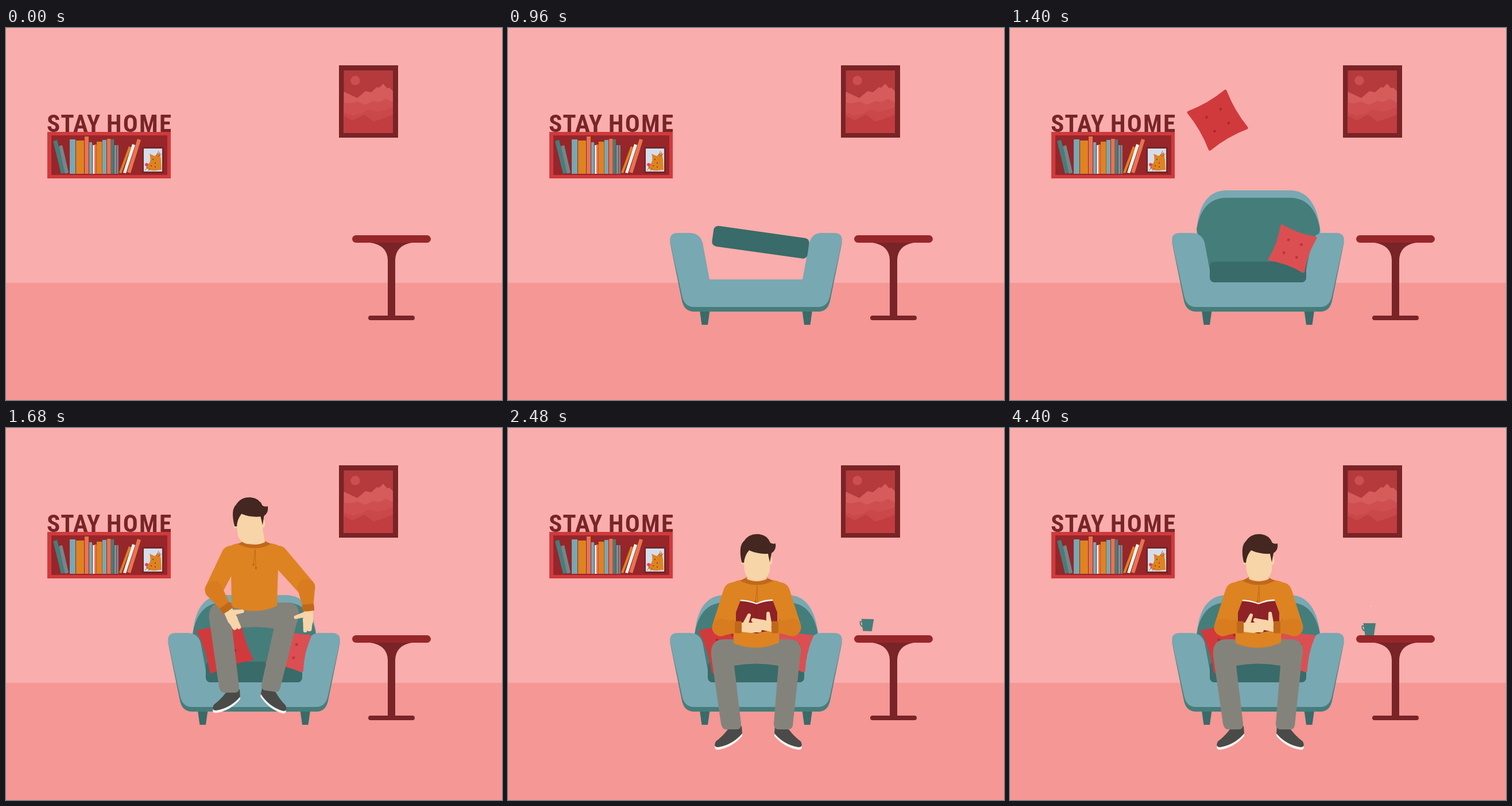
Recreate the animation shown at these times as an HTML page with a canvas. Size 864 by 648 pixels, loop 4.84 s.

```html
<!DOCTYPE html>
<html lang="en">
<head>
<meta charset="utf-8">
<title>Stay home</title>
<style>
html, body { margin: 0; width: 100%; height: 100%; overflow: hidden; background: #f9adac; }
canvas { display: block; width: 864px; height: 648px; }
</style>
</head>
<body>
<canvas id="stage" width="864" height="648"></canvas>
<script>
const ctx = document.getElementById('stage').getContext('2d');
const LOOP = 4840, STEP = 40;
const C = {
  wall: '#f9adac', floor: '#f49795', maroon: '#792427', wine: '#96262a', red: '#d03a3d',
  light: '#78a8b2', mid: '#457d7b', dark: '#386b69',
  orange: '#dd8322', sleeve: '#d97c1f', rust: '#c0681a', coral: '#e8734f',
  skin: '#f8d4a9', hair: '#432720', pants: '#84837b', shoe: '#4a4b48', white: '#f6f3f1'
};
let now = 0;

const rad = d => d * Math.PI / 180;
const mix = (a, b, k) => a + (b - a) * k;
function ease(from, to) {
  const p = Math.min(1, Math.max(0, (now - from) / (to - from)));
  return p * p * (3 - 2 * p);
}

function path(d, color) {
  ctx.fillStyle = color;
  ctx.fill(new Path2D(d));
}
function line(d, color, width) {
  ctx.strokeStyle = color;
  ctx.lineWidth = width;
  ctx.stroke(new Path2D(d));
}
function rect(x, y, w, h, color, r = 0) {
  ctx.fillStyle = color;
  ctx.beginPath();
  ctx.roundRect(x, y, w, h, r);
  ctx.fill();
}
function oval(x, y, rx, ry, color) {
  ctx.fillStyle = color;
  ctx.beginPath();
  ctx.ellipse(x, y, rx, ry, 0, 0, 7);
  ctx.fill();
}
// Rounded bar whose radius runs from r1 to r2
function bar(x1, y1, r1, x2, y2, r2, color) {
  const a = Math.atan2(y2 - y1, x2 - x1), q = Math.PI / 2;
  ctx.fillStyle = color;
  ctx.beginPath();
  ctx.arc(x2, y2, r2, a - q, a + q);
  ctx.arc(x1, y1, r1, a + q, a + 3 * q);
  ctx.fill();
}
// Draw with an offset and a turn around (cx, cy)
function placed(cx, cy, dx, dy, deg, draw) {
  ctx.save();
  ctx.translate(cx + dx, cy + dy);
  ctx.rotate(rad(deg));
  ctx.translate(-cx, -cy);
  draw();
  ctx.restore();
}
function drop(from, to, cx, cy, dx, dy, deg, draw) {
  if (now <= from) return;
  const k = 1 - ease(from, to);
  placed(cx, cy, dx * k, dy * k, deg * k, draw);
}
function mirror(x, draw) {
  ctx.save();
  ctx.translate(2 * x, 0);
  ctx.scale(-1, 1);
  draw();
  ctx.restore();
}

function word(text, x, width) {
  ctx.letterSpacing = '0px';
  const gap = (width - ctx.measureText(text).width) / (text.length - 1);
  ctx.letterSpacing = gap.toFixed(2) + 'px';
  ctx.fillText(text, x, 181);
  ctx.letterSpacing = '0px';
}

function shelf() {
  ctx.fillStyle = C.maroon;
  ctx.font = "bold 43px 'Roboto Condensed', 'Liberation Sans Narrow', Roboto, sans-serif";
  word('STAY', 71, 93);
  word('HOME', 175, 113);
  rect(72, 181, 215, 81, C.red);
  rect(79, 187, 202, 69, C.wine);
  path('M82 197L89 195L103 252L96 254Z', C.mid);
  path('M92 206L98 204L109 252L103 254Z', '#74868a');
  const books = [
    [111, 194, 10, C.light], [122, 196, 14, C.orange], [137, 189, 7, C.coral],
    [145, 199, 5, C.light], [151, 204, 3, C.white], [154, 203, 3.5, C.coral],
    [158, 198, 9.5, C.orange], [168, 195, 7, C.light], [176, 193, 6.5, C.coral],
    [183, 194, 5, C.mid], [189, 204, 2.5, C.light], [192.5, 204, 3.5, '#74868a']
  ];
  for (const [x, y, w, color] of books) rect(x, y, w, 254 - y, color);
  path('M214 206L218 208L201 253L197 252Z', C.orange);
  path('M220 202L225 204L209 253L204 252Z', C.white);
  path('M229 193L235 195L217 253L211 251Z', C.coral);
  rect(237, 207, 38, 46, C.maroon);
  rect(240, 210, 32, 40, '#d5ddec');
  path('M250 219L259 223L268 216L270 230L271 247L262 248Q254 250 245 245Q242 239 250 235Q253 228 250 219Z', C.orange);
  oval(245, 238, 2.8, 2.8, '#e0405a');
  for (const [x, y] of [[256, 229], [260, 235], [253, 240], [260, 242]]) oval(x, y, 0.9, 0.9, C.maroon);
  line('M262 222L266 214M264 224L271 219M247 242L242 248M251 244L248 249', C.maroon, 0.6);
}

function picture() {
  rect(580, 65, 103, 126, C.maroon);
  rect(588.5, 74, 85.5, 109, '#b53a3c');
  oval(608.5, 91.5, 8.3, 8.3, '#cc4e50');
  path('M588.5 111L612 122L626 110L636 112L646 103L650 104L657 97L664 105L668 104L674 110V183H588.5Z', '#d65c5c');
  path('M588.5 130L600 131L612 128L625 134L640 127L650 129L662 123L674 130V183H588.5Z', '#cf4f50');
  path('M588.5 147L603 153L617 150L632 142L648 146L660 143L674 138V183H588.5Z', '#ca4849');
  path('M588.5 153L604 161L624 151L640 163L656 158L674 151V183H588.5Z', '#c13d40');
}

function table() {
  path('M635 374Q665 379 665 405V503H678V405Q678 379 707 374Z', C.maroon);
  rect(631, 501, 81, 8, C.maroon, 4);
  rect(603, 361, 137, 13, C.wine, 6.5);
}

function room() {
  rect(0, 0, 864, 648, C.wall);
  rect(0, 444, 864, 204, C.floor);
  shelf();
  picture();
  table();
}

function sofaLeg(x) {
  path(`M${x} 492h17.5l-3.5 25h-10.5Z`, C.dark);
}
function sofaBack() {
  path('M325 365Q329 291 378 291H487Q534 291 541 365L520 440H345Z', C.light);
  path('M325 359Q334 304 378 304H487Q530 304 540 359L520 440H345Z', C.mid);
}
function sofaBody() {
  path('M282 372L303 475Q307 494 324 494H541Q557 494 561 475L582 372L550 450H314Z', C.mid);
  path('M282.5 373Q280 357 296 357H316Q334 357 339 374L351 438H513L525 374Q530 357 546 357H568Q584 357 581.5 373L561 466Q557 486 540 486H324Q307 486 303 466Z', C.light);
}
function seat() {
  if (now <= 427) return;
  const tilt = ease(427, 960), back = ease(960, 1090);
  placed(432, 425, -37 + 45 * tilt - 8 * back, -517 * (1 - ease(427, 1090)),
    -48 + 56 * tilt - 8 * back, () => rect(348, 407, 168, 36, C.dark, 8));
}

function pillow(x, y, half, deg, color, dot) {
  const h = half - 2, b = h - 6;
  ctx.save();
  ctx.translate(x, y);
  ctx.rotate(rad(deg));
  ctx.lineJoin = 'round';
  const d = `M${-h} ${-h}Q0 ${-b} ${h} ${-h}Q${b} 0 ${h} ${h}Q0 ${b} ${-h} ${h}Q${-b} 0 ${-h} ${-h}Z`;
  path(d, color);
  line(d, color, 5);
  const s = half * 0.36;
  for (const i of [-s, s]) for (const j of [-s, s]) oval(i, j, 2.4, 2.4, dot);
  ctx.restore();
}
function pillows() {
  if (now > 960) {
    const k = 1 - ease(960, 1416);
    pillow(492 + 60 * k, 386 - 480 * k, 33, 13 + 67 * (1 - ease(1000, 1500)), '#db4f52', '#bb3439');
  }
  if (now > 1155) {
    const k = 1 - ease(1155, 1635);
    pillow(381.5 - 41 * k, 378.5 - 450 * k, 39, -17.5 - 26 * k, C.red, '#ad2a2f');
  }
}

function shoe() {
  const d = 'M383 525Q374 537 362 546Q357 556 366 556Q391 552 408 532L407 519Z';
  ctx.save();
  ctx.translate(0, 4.5);
  path(d, C.white);
  ctx.restore();
  path(d, C.shoe);
}
function legs(turn) {
  const tap = now > 2480 && now < 3560 ? 2.5 * (1 - Math.cos((now - 2480) / 540 * 2 * Math.PI)) : 0;
  placed(404, 526, 0, 0, tap, shoe);
  placed(489, 385, 0, 0, turn, () => {
    mirror(436, shoe);
    path('M474 380L510 388L496 518Q495 525 488 525H470Q463 524 463 515L471 414Z', C.pants);
  });
  path('M354 397Q351 368 378 368H488Q513 368 510 394L502 416L471 414Q432 407 394 414L406 515Q407 525 398 525H380Q373 525 371 515Z', C.pants);
}

function torso() {
  path('M404 265Q384 268 378 285L392 308L393 375Q432 391 472 374L474 308L490 285Q483 268 462 265Z', C.orange);
  line('M434 275L431 302M434 275L435 308', C.rust, 1);
  oval(431, 302, 1.8, 2.2, C.rust);
  oval(435.5, 308, 1.8, 2.2, C.rust);
  path('M404 266L416 260H449L462 266Q433 281 404 266Z', C.rust);
  path('M420 245H448L451 263Q433 271 416 263Z', C.skin);
}
function head() {
  oval(408.5, 231, 3, 7, C.skin);
  oval(457.5, 231, 3, 7, C.skin);
  path('M409 212H457L456 248Q452 266 434 266Q415 266 412 248Z', C.skin);
  line('M415 257Q422 266 434 266Q446 266 451 259', '#edc394', 0.8);
  path('M407 234Q401 205 411 197Q420 183 438 185Q452 187 457 200Q462 203 466 201Q468 212 459 218L456 234L453 219Q435 220 420 213Q412 222 411 235Z', C.hair);
}
function book() {
  path('M398 299Q417 298 433 305Q450 297 468 299V310H398Z', C.white);
  path('M397 301Q417 301 433 307Q450 300 469 301V354Q450 352 433 358Q416 352 397 354Z', '#8e2226');
  line('M433 307V358', C.maroon, 1.2);
}
function hand(x, y, deg) {
  ctx.save();
  ctx.translate(x, y);
  ctx.rotate(rad(deg));
  bar(0, 0, 8, 17, 1, 9, C.skin);
  bar(14, -3, 5, 34, -2, 3.5, C.skin);
  bar(14, 4, 5, 31, 5, 4, C.skin);
  bar(6, -4, 5, 13, -21, 3, C.skin);
  ctx.restore();
}
// Each value runs from the open pose to the reading pose
function arm(k, ex0, ey0, wx0, wy0, deg0, deg1) {
  const ex = mix(ex0, 371, k), ey = mix(ey0, 347, k);
  const wx = mix(wx0, 398, k), wy = mix(wy0, 347, k);
  const a = Math.atan2(wy - ey, wx - ex);
  hand(wx + 9 * Math.cos(a), wy + 9 * Math.sin(a), mix(deg0, deg1, k));
  bar(392, 286, 17, ex, ey, 15.5, C.orange);
  bar(ex, ey, 15.3, wx, wy, 9.5, C.sleeve);
  ctx.save();
  ctx.translate(wx, wy);
  ctx.rotate(a);
  rect(-3, -10.5, 12, 21, C.rust, 2);
  ctx.restore();
}
function person() {
  const lean = 1 - ease(1680, 1880), hold = ease(1680, 2080);
  legs(8 * lean);
  torso();
  placed(433, 262, -8 * lean, 0, -2 * lean, head);
  drop(1760, 2200, 433, 328, 0, -380, 20, book);
  arm(hold, 362, 346, 382, 375, 60, 0);
  mirror(433, () => arm(hold, 343, 342, 340, 374, 84, -18));
}

function cup() {
  line('M619 345H613.5Q613 353 619 353.5', C.mid, 2);
  path('M615.5 340H637L634 361H618.5Z', C.mid);
}
function wisp(x, base, top, from, to) {
  if (to <= from) return;
  ctx.beginPath();
  for (let i = 0; i <= 24; i++) {
    const p = mix(from, to, i / 24);
    ctx.lineTo(x + 2.6 * Math.sin(p * 6.5), mix(base, top, p));
  }
  ctx.lineCap = 'round';
  ctx.lineWidth = 1.6;
  ctx.strokeStyle = 'rgba(255,240,238,.5)';
  ctx.stroke();
  ctx.lineCap = 'butt';
}
function steam() {
  wisp(621, 339, 305, ease(3200, 4150), ease(2700, 3350));
  wisp(628, 339, 310, 0.97 * ease(3300, 4400), ease(2620, 3250));
}

function draw() {
  room();
  drop(200, 580, 342, 505, 0, -530, -25, () => sofaLeg(334));
  drop(232, 632, 521, 505, 110, -530, 200, () => sofaLeg(512.5));
  drop(940, 1440, 432, 370, 0, -460, 0, sofaBack);
  drop(240, 790, 432, 425, 8, -484, 7, sofaBody);
  seat();
  pillows();
  drop(1400, 1752, 433, 400, 0, -590, 0, person);
  steam();
  drop(2040, 2520, 626, 350, 0, -370, 60, cup);
}

function tick(ms) {
  now = Math.floor(ms % LOOP / STEP) * STEP;
  draw();
  requestAnimationFrame(tick);
}
draw();
requestAnimationFrame(tick);
</script>
</body>
</html>
```
